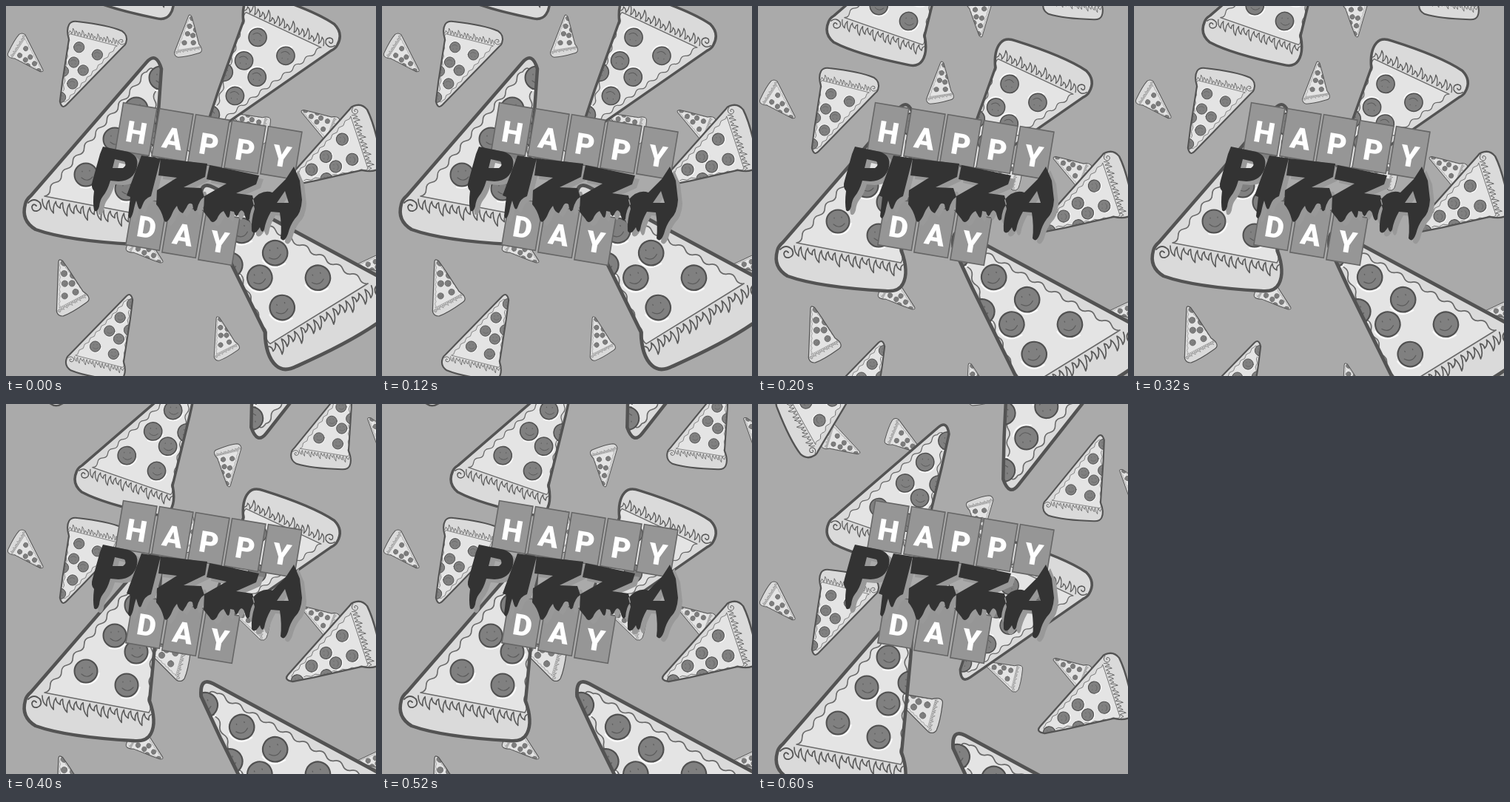
An HTML page for the animation above (0.8 s loop, 500 px wide and 500 px high).

```html
<!DOCTYPE html>
<html lang="en">
<head>
<meta charset="utf-8">
<title>Happy Pizza Day</title>
<style>
html, body { margin: 0; height: 100%; overflow: hidden; background: #aaa; }
svg { display: block; width: 100vw; height: 100vh; }
text { font: 800 40px Roboto, "Open Sans", sans-serif; font-stretch: 75%; text-anchor: middle; fill: #fff; }
</style>
</head>
<body>
<svg viewBox="0 0 500 500">
  <defs>
    <path id="edge" d="M190 76Q203 61 210 85L206 142L194 268Q204 296 196 312Q190 324 172 322Q82 317 40 302Q20 290 26 268Q27 262 34 256Z"/>
    <clipPath id="inside"><use href="#edge"/></clipPath>
    <g id="pepperoni">
      <path d="M-7 17Q13 21 18 3" fill="none" stroke="#fafafa" stroke-width="2"/>
      <circle r="15.5" fill="#808080" stroke="#505050" stroke-width="2"/>
      <path d="M-6 4Q2 11 9 3M-5-5v1M5-6v1" fill="none" stroke="#5c5c5c" stroke-width="1.2"/>
    </g>
    <g id="slice" stroke-linejoin="round" stroke-linecap="round">
      <use href="#edge" fill="#dadada"/>
      <g clip-path="url(#inside)">
        <path id="cheese" fill="#e4e4e4" stroke="#6a6a6a" stroke-width="1.6"/>
        <g id="toppings"></g>
      </g>
      <path id="fringe" fill="none" stroke="#5a5a5a" stroke-width="1.6"/>
      <path d="M41 270q-4-4-6 1q0 7 7 6q8-3 4-11q-8-8-16 0" fill="none" stroke="#555" stroke-width="1.8"/>
      <use href="#edge" fill="none" stroke="#535353" stroke-width="4.5"/>
    </g>
    <path id="pizza" fill-rule="evenodd" d="
      M131 190L165 197Q180 202 177 217Q173 236 152 237L141 236Q137 250 131 257Q127 262 126 271Q123 280 119 276Q117 266 119 250Q114 245 117 236L127 200ZM147 207l13 3q4 5-2 9l-14 0z
      M183 202L209 206L196 257Q187 260 184 270Q181 279 178 270L176 263Q174 268 172 278Q168 292 165 284L168 258L163 256Z
      M209 206L272 213L269 231L240 245L264 246L268 258Q261 262 258 275Q254 282 252 268Q247 264 244 272L239 280Q233 278 231 270Q227 274 223 284Q216 297 213 288Q210 276 203 268L204 249L231 232L206 229Z
      M275 215L342 229L338 241L311 253L333 256L336 268Q330 274 329 288Q325 294 322 280Q318 272 314 281Q311 288 308 278L303 277Q302 290 298 284L294 277Q288 280 285 288Q279 296 275 288L267 278L268 257L298 240L271 234Z
      M389 217L397 236L400 262Q399 280 390 288Q384 296 381 308Q376 321 371 314Q373 298 370 279L358 278Q351 290 349 302Q346 309 343 299Q336 311 332 304Q331 290 336 274L333 262Q346 247 360 252L378 234ZM366 266l11-16l5 16z"/>
  </defs>
  <g id="rain"></g>
  <g id="cards"></g>
  <use href="#pizza" x="6" y="5" fill="#999"/>
  <use href="#pizza" fill="#333"/>
</svg>
<script>
const $ = id => document.getElementById(id);

// Wavy line by (dx, dy) in n bows of alternating side
function wave(dx, dy, n, amp) {
  const len = Math.hypot(dx, dy);
  let d = '';
  for (let i = 0; i < n; i++) {
    const s = (i % 2 ? -amp : amp) / len;
    d += `q${dx / n / 2 - dy * s} ${dy / n / 2 + dx * s} ${dx / n} ${dy / n}`;
  }
  return d;
}

$('cheese').setAttribute('d', 'M52 257' + wave(138, -168, 18, 5) + 'Q198 78 203 92' + wave(-10, 192, 16, 4) + 'Z');

let hairs = 'M49 261';
for (let i = 0; i < 16; i++) {
  const h = 14 + 5 * Math.sin(i * 2.4);
  hairs += `q0 ${h * 0.7} 6 ${h}q-1 ${-h * 0.6} 3.2 ${1.6 - h}`;
}
$('fringe').setAttribute('d', hairs);

$('toppings').innerHTML = [[209, 97], [176, 139], [147, 180], [205, 174], [176, 202], [108, 228], [163, 247]]
  .map(([x, y]) => `<use href="#pepperoni" x="${x}" y="${y}"/>`).join('');

// Slices by size, back to front: tip x, tip y, direction from tip to curl, mirrored
const sizes = [
  [0.21, [50, 88, -119], [248, 12, 109], [399, 142, 48], [285, 420, 91], [474, 350, -23, 1], [212, 346, -125],
    [305, 147, 42], [302, -21, -76], [138, -137, -135], [222, -138, -129], [489, -114, 68], [306, -258, 110]],
  [0.27, [72, 343, 90], [182, 190, 43]],
  [0.46, [167, 390, 132], [77, 136, -48], [463, -161, 127]],
  [0.52, [379, 238, -46, 1], [146, -252, 123, 1]],
  [0.78, [252, -175, 137], [278, 169, -37]],
  [1, [342, -87, -54], [200, 70, 128.7]],
  [1.08, [268, 243, 30.5, 1]]
];

$('rain').innerHTML = sizes.flatMap(([size, ...slices]) => slices.map(([x, y, dir, mirrored]) => {
  const flip = mirrored ? -1 : 1;
  return `<use href="#slice" transform="translate(${x} ${y}) rotate(${dir - 128.7 * flip})
    scale(${size} ${size * flip}) translate(-200 -70)"/>`;
})).join('');

// A word on a row of tilted cards
const row = (word, x, y, slope) => [...word].map((c, i) =>
  `<g transform="translate(${x + 49 * i} ${y + slope * i}) rotate(9.5)">
    <rect x="-23" y="-32" width="46" height="65" fill="#969696" stroke="#666" stroke-width="1.6"/>
    <text x="1" y="19">${c}</text></g>`).join('');
$('cards').innerHTML = row('HAPPY', 176, 166, 8) + row('DAY', 190, 294, 10);

function draw() {
  const step = Math.floor(performance.now() % 800 / 200);
  $('rain').setAttribute('transform', `translate(0 ${step && 70 * step - 7})`);
  requestAnimationFrame(draw);
}
draw();
</script>
</body>
</html>
```
